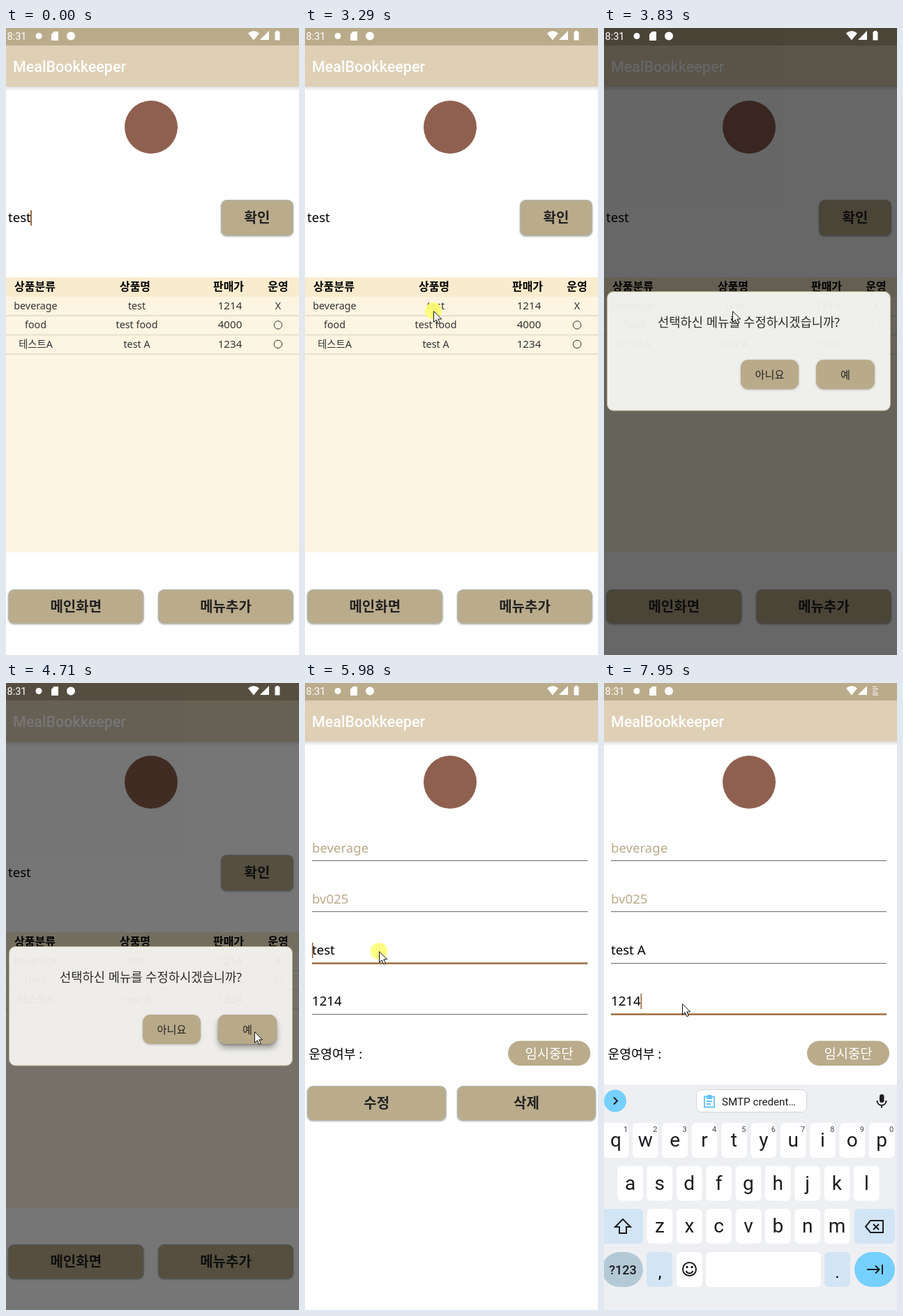
An HTML page that plays this animation: 420x898 px, repeating every 8000 ms.

```html
<!DOCTYPE html>
<html lang="ko">
<head>
<meta charset="utf-8">
<title>Menu editing</title>
<style>
html, body { margin: 0; width: 100%; height: 100%; overflow: hidden; background: #fff; }
svg { display: block; width: 100vw; height: 100vh; font-family: "Noto Sans", "Noto Sans CJK KR", "Noto Sans CJK", sans-serif; }
.ui { font-family: Roboto, sans-serif; }
.mid { text-anchor: middle; }
.btn { fill: #baab8b; stroke: #adb8b5; stroke-width: 1.2; filter: drop-shadow(0 1.5px 1px #0004); }
.soft { fill: #baab8b; filter: drop-shadow(0 1.5px 1.5px #0004); }
.label { font-size: 20px; font-weight: 700; fill: #222; }
.field { font-size: 18.6px; }
.thin { stroke: #6d6a68; }
.focus { fill: #9c6b3c; }
.ink { fill: none; stroke: #1c1c1e; stroke-width: 2; }

/* One cycle is 8 s, so 1% is 80 ms. */
.a { animation: 8s linear infinite; }
.s { animation: 8s step-end infinite; }
#mouse { animation-name: mouse; }
#halo { animation-name: halo; }
#dim { animation-name: dim; }
#dialog { animation-name: dialog; }
#press { animation-name: press; }
#list { animation-name: list; }
#form { animation-name: form; }
#keys { animation-name: keys; }
#searchCaret { animation-name: searchCaret; }
#nameFocus { animation-name: nameFocus; }
#nameCaret { animation-name: nameCaret; }
#typed { animation-name: typed; }
#price { animation-name: price; }
#full { animation-name: full; }
#bars { animation-name: bars; }

@keyframes mouse {
  0%, 4% { transform: translate(402px, 902px); }
  4.125% { transform: translate(402px, 878px); }
  13.5% { transform: translate(241px, 453px); }
  18.75% { transform: translate(226px, 428px); }
  22.75%, 23.4% { transform: translate(238px, 430px); }
  30% { transform: translate(385px, 420px); }
  33.25%, 34.75% { transform: translate(390px, 410px); }
  36.6%, 50% { transform: translate(184px, 405px); }
  53.9%, 61.9% { transform: translate(356px, 499px); }
  66.75% { transform: translate(270px, 268px); }
  67.6% { transform: translate(245px, 252px); }
  73.5%, 75.4% { transform: translate(106px, 384px); }
  77.4% { transform: translate(112px, 394px); }
  79.9%, 82.4% { transform: translate(112px, 399px); }
  86.6%, 92.1% { transform: translate(112px, 352px); }
  96.25%, 100% { transform: translate(112px, 459px); }
}
@keyframes halo {
  0%, 43.75%, 58%, 75.6%, 98.4% { opacity: 0; }
  41.125%, 57.125%, 73.75%, 96.75% { opacity: .9; }
}
@keyframes dim {
  0%, 45% { opacity: 0; }
  45.25% { opacity: .08; }
  46.125%, 46.8% { opacity: .27; }
  47% { opacity: .5; }
  47.9%, 58.25% { opacity: .6; }
  58.875%, 59.6% { opacity: .54; }
  59.75% { opacity: .2; }
  60.5%, 100% { opacity: 0; }
}
@keyframes dialog {
  0%, 45% { opacity: 0; transform: translateY(22px); }
  45.25% { opacity: .4; transform: translateY(16px); }
  46.125%, 46.8% { opacity: .95; transform: translateY(4.5px); }
  47.9%, 58.25% { opacity: 1; transform: none; }
  58.875%, 59.6% { opacity: .98; transform: none; }
  59.75% { opacity: .35; transform: none; }
  60.5%, 100% { opacity: 0; transform: none; }
}
@keyframes press { 0%, 60.5% { opacity: 0; } 57.125% { opacity: 1; } }
@keyframes list {
  0%, 60.5% { transform: none; }
  60.625%, 61.4% { transform: translateX(-.6px); animation-timing-function: cubic-bezier(.2, 0, .1, 1); }
  66.75%, 100% { transform: translateX(-42px); }
}
@keyframes form {
  0%, 61.45% { opacity: 0; transform: translateX(41px); }
  62.6% { opacity: 1; transform: translateX(22px); animation-timing-function: cubic-bezier(.1, .6, .2, 1); }
  66.75%, 100% { opacity: 1; transform: none; }
}
@keyframes keys {
  0%, 77.9% { transform: translateY(326px); }
  78.125% { transform: translateY(220px); }
  79% { transform: translateY(60px); }
  79.9%, 100% { transform: none; }
}
@keyframes searchCaret {
  0%, 10.375%, 22.75%, 35% { opacity: 1; }
  4.125%, 16.625%, 29.125%, 41.125% { opacity: 0; }
}
@keyframes nameFocus { 0%, 97% { opacity: 0; } 74.3% { opacity: 1; } }
@keyframes nameCaret {
  0% { opacity: 0; transform: none; }
  74.3% { opacity: 1; transform: none; }
  76% { opacity: 1; transform: translateX(32px); }
  82.375% { opacity: 0; transform: translateX(32px); }
  83.25% { opacity: 1; transform: translateX(37px); }
  85.75% { opacity: 1; transform: translateX(49px); }
  92.375%, 100% { opacity: 0; transform: translateX(49px); }
}
@keyframes typed { 0% { fill-opacity: 0; } 85.75%, 100% { fill-opacity: 1; } }
@keyframes price { 0% { opacity: 0; } 97%, 100% { opacity: 1; } }
@keyframes full { 0% { opacity: 1; } 82.375%, 100% { opacity: 0; } }
@keyframes bars { 0% { opacity: 0; } 82.375%, 100% { opacity: 1; } }
</style>
</head>
<body>
<svg viewBox="0 0 420 898" preserveAspectRatio="none">
  <defs>
    <linearGradient id="shade" x2="0" y2="1">
      <stop stop-color="#000" stop-opacity=".13"/>
      <stop offset="1" stop-color="#000" stop-opacity="0"/>
    </linearGradient>
    <g id="head">
      <path d="M-60 0H480V898H-60z" fill="#fff"/>
      <path d="M-60 84H480V90H-60z" fill="url(#shade)"/>
      <path d="M-60 25H480V84H-60z" fill="#decfb5"/>
      <path d="M-60 0H480V25H-60z" fill="#baab8b"/>
      <text class="ui" x="10" y="63" font-size="21.5" font-weight="500" fill="#fff">MealBookkeeper</text>
      <circle cx="208" cy="142" r="38" fill="#8f6050"/>
    </g>
  </defs>

  <g id="list" class="a">
    <use href="#head"/>
    <text class="field" x="3" y="278">test</text>
    <path id="searchCaret" class="s focus" d="M35 261h2v22h-2z"/>
    <path d="M-60 357H480V385H-60z" fill="#f9ecce"/>
    <path d="M-60 385H480V751H-60z" fill="#fdf4e1"/>
    <path d="M-60 412H480M-60 439.5H480M-60 467H480" stroke="#dedacd" stroke-width="1.6"/>
  </g>

  <g id="form" class="a">
    <use href="#head"/>
    <g class="field">
      <g fill="#baab8b"><text x="10" y="243">beverage</text><text x="10" y="316">bv025</text></g>
      <text x="10" y="389">test<tspan id="typed" class="s"> A</tspan></text>
      <text x="10" y="462">1214</text>
      <text x="5.5" y="538" font-size="18.2" font-weight="500">운영여부 :</text>
    </g>
    <path class="thin" d="M10 254.5H405M10 327.5H405M10 401.5H405M10 474.5H405"/>
    <path id="nameFocus" class="s focus" d="M10 400.3h395v2.4h-395z"/>
    <path id="nameCaret" class="s focus" d="M10 372h1.6v22h-1.6z"/>
    <path id="price" class="s focus" d="M10 473.3h395v2.4h-395zM52.5 445h1.6v22h-1.6z"/>
    <rect x="291" y="512.5" width="118" height="35.5" rx="17.7" fill="#baab8b"/>
    <text class="mid" x="350" y="537.5" font-size="18.8" fill="#fff">임시중단</text>
  </g>

  <path id="dim" class="a" d="M0 0H420V898H0z"/>

  <g id="dialog" class="a">
    <rect x="4.5" y="377.5" width="406" height="170.5" rx="9" fill="#fcfcfa" fill-opacity=".92" stroke="#bcb189"/>
    <text class="mid" x="207.5" y="427.5" font-size="17.7" fill="#2b2b2b">선택하신 메뉴를 수정하시겠습니까?</text>
    <rect id="press" class="s" x="304" y="475" width="84" height="42" rx="11" fill="#baab8b" style="filter:drop-shadow(0 6px 4px #0005)"/>
    <rect class="soft" x="196" y="475" width="83" height="42" rx="11"/>
    <rect class="soft" x="304" y="475" width="84" height="42" rx="11"/>
    <g class="mid" font-size="15.2" fill="#222">
      <text x="237.5" y="502">아니요</text>
      <text x="346" y="502">예</text>
    </g>
  </g>

  <g id="keys" class="a ui">
    <path d="M0 575H420V898H0z" fill="#eeeff2"/>
    <circle cx="16" cy="598.5" r="16" fill="#76d0ff"/>
    <path class="ink" d="M14 593.5l5 5-5 5"/>
    <rect x="132.5" y="582.5" width="158" height="32" rx="7" fill="#fff" stroke="#d3d5d9"/>
    <path d="M144 592.5h14v15h-14zM148 592v3h6v-3M147 599h8M147 603h6" fill="none" stroke="#62c3f3" stroke-width="1.8"/>
    <path d="M148 590h6v4h-6z" fill="#62c3f3"/>
    <text x="169" y="605" font-size="15.2" fill="#1c1c1e">SMTP credent…</text>
    <rect x="395" y="589" width="6.5" height="12" rx="3.2" fill="#1c1c1e"/>
    <path class="ink" d="M391.5 598c0 9 13 9 13 0M398 604.5v4"/>
  </g>

  <g id="status" fill="#fff">
    <text class="ui" x="1.5" y="17" font-size="14.5">8:31</text>
    <circle cx="47" cy="11.5" r="4.5"/>
    <path d="M69 5h6v13H65V9z"/>
    <circle cx="93" cy="11.5" r="6"/>
    <path d="M347 7.500q8-6.500 16 0L355 17.500zM377 4V17H364z"/>
    <path id="full" class="s" d="M387 4h4v1.500h1.500V17.500h-7V5.500h1.500z"/>
    <path id="bars" class="s" d="M385 5.500h6M385 8.500h8M385 11.500h6M385 14.500h8M385 17h8" stroke="#fff" stroke-width="1.2"/>
  </g>

  <g id="mouse" class="a">
    <circle id="halo" class="s" r="12" fill="#ffff73"/>
    <path d="M.5.7V16.300l3.700-3.400 2.500 5.800 2.600-1.100-2.500-5.700h4.900z" fill="#fff" stroke="#111"/>
  </g>
</svg>
<script>
const el = id => document.getElementById(id);
const add = (id, html) => el(id).insertAdjacentHTML('beforeend', html);
const text = (x, y, size, label, more = '') =>
  `<text class="mid" x="${x}" y="${y}" font-size="${size}" ${more}>${label}</text>`;
const button = (x, y, w, h, label) =>
  `<rect class="btn" x="${x}" y="${y}" width="${w}" height="${h}" rx="8"/>
   <text class="mid label" x="${x + w / 2}" y="${y + h / 2 + 7}">${label}</text>`;

// Menu table
const columns = [[41.5, '상품분류'], [185, '상품명'], [319, '판매가'], [390, '운영']];
const rows = [['beverage', 'test', 1214, false], ['food', 'test food', 4000, true], ['테스트A', 'test A', 1234, true]];
columns.forEach(([x, name]) => add('list', text(x, 376, 16, name, 'font-weight="700"')));
rows.forEach(([kind, name, price, open], i) => {
  const y = 403 + i * 27.4;
  add('list', `<g fill="#333">${text(42.5, y, 14.3, kind)}${text(187.5, y, 14.3, name)}${text(321, y, 15.2, price)}</g>`);
  add('list', open
    ? `<circle cx="390" cy="${y - 5}" r="5.7" fill="none" stroke="#333"/>`
    : text(390, y, 14.3, 'X', 'fill="#333"'));
});
add('list', button(308.5, 246.5, 103, 51, '확인') + button(3.5, 804.5, 193.5, 48.5, '메인화면') + button(218.5, 804.5, 193, 48.5, '메뉴추가'));
add('form', button(3.5, 577.5, 198.5, 49, '수정') + button(218.5, 577.5, 198, 49, '삭제'));

// Keyboard
const pitch = 42.35;
const cap = (x, y, w, fill = '#fff', r = 6) =>
  `<rect x="${x}" y="${y}" width="${w}" height="50" rx="${r}" fill="${fill}"/>`;
const letters = (chars, x0, y) => [...chars].forEach((c, i) => {
  const x = x0 + i * pitch;
  add('keys', cap(x - 18.3, y, 36.6) + text(x, y + 34, 28, c, 'fill="#1c1c1e"'));
});
letters('qwertyuiop', 17, 630);
[...'1234567890'].forEach((d, i) => add('keys', text(31 + i * pitch, 643, 11, d, 'fill="#444"')));
letters('asdfghjkl', 37.5, 691.5);
letters('zxcvbnm', 80, 753);
const pale = '#d2e5f4', y4 = 815;
add('keys',
  cap(-4, 753, 60, pale) + cap(359, 753, 58, pale) +
  cap(-3, y4, 59, '#b3c9d6', 25) + cap(61, y4, 37, pale) + cap(104, y4, 37) +
  cap(146, y4, 165) + cap(316, y4, 37, pale) + cap(359, y4, 58, '#76d0ff', 25) +
  text(27, 847, 18, '?123', 'fill="#1c1c1e" font-weight="500"') +
  text(80, 852, 24, ',') + text(334.5, 852, 24, '.') +
  `<path class="ink" d="M27 768l11 11h-6v9h-10v-9h-6z"/>
   <path class="ink" d="M382 770h18v17h-18l-7-8.5zM386 775l8 8M394 775l-8 8"/>
   <path class="ink" d="M377 840h17M389 834.5l5.5 5.5-5.5 5.5M399 833v14"/>
   <circle class="ink" cx="122.5" cy="839.5" r="9.5"/>
   <path class="ink" d="M117.5 842c2 4.5 8 4.5 10 0"/>
   <circle cx="119" cy="836.5" r="1.6"/><circle cx="126" cy="836.5" r="1.6"/>`);
</script>
</body>
</html>
```
